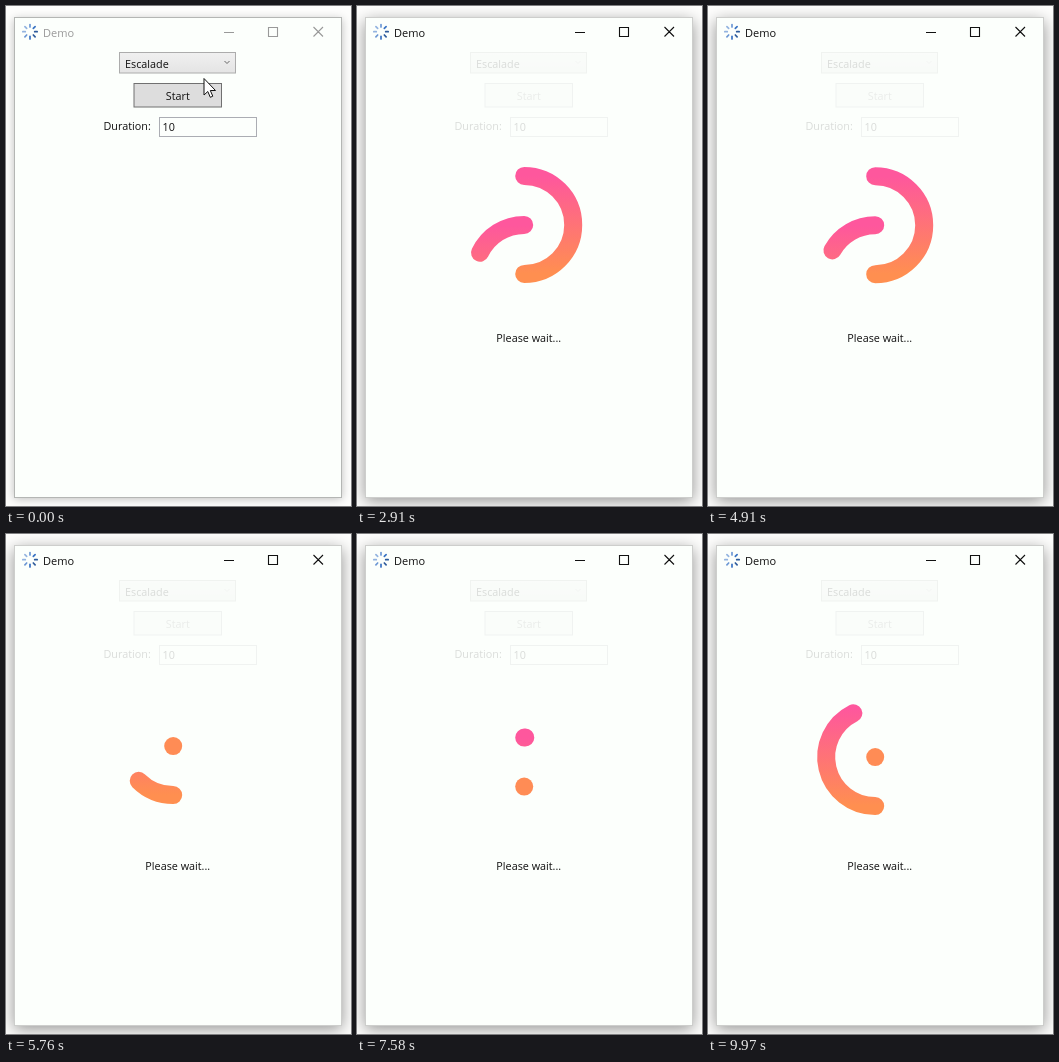
Animation, 345 px wide and 500 px high, one loop 10 s. Source, as an HTML page:

```html
<!DOCTYPE html>
<html lang="en">
<head>
<meta charset="utf-8">
<title>Demo</title>
<style>
  html, body { margin: 0; width: 100%; height: 100%; overflow: hidden; background: #fdfdfc; }
  svg { display: block; width: 345px; height: 500px; }
  text { font: 10.8px "Open Sans", "Noto Sans", sans-serif; fill: #111; }
  #title { font-size: 11px; }
  #arcs path { fill: none; stroke-width: 18; stroke-linecap: round; }
  .busy #label { fill: #838383; }
  .busy #chevron { stroke: #bfbfbf; }
</style>
</head>
<body>
<svg viewBox="0 0 345 500">
  <defs>
    <linearGradient id="warm" gradientUnits="userSpaceOnUse" x1="0" y1="-58" x2="0" y2="58">
      <stop offset=".08" stop-color="#fe579d"/>
      <stop offset=".92" stop-color="#ff8f50"/>
    </linearGradient>
    <linearGradient id="face" x2="0" y2="1">
      <stop stop-color="#f0f0f0"/>
      <stop offset="1" stop-color="#e4e4e4"/>
    </linearGradient>
  </defs>

  <rect id="shadow" x="8" width="328" height="480"/>
  <rect id="frame" x="8.5" y="11.5" width="327" height="480" fill="#fcfffc"/>

  <g id="icon" stroke-width="1.7" stroke-linecap="round"></g>
  <text id="title" x="37" y="30.500">Demo</text>
  <g id="buttons" fill="none" stroke-width="1.1">
    <path d="M218 26.500H228M262.500 21.500H271.500V30.500H262.500ZM307.500 21L317 30.500M317 21L307.500 30.500"/>
  </g>

  <g id="form">
    <rect x="113.500" y="46.500" width="116" height="20.500" fill="url(#face)" stroke="#acacac"/>
    <text x="119" y="61.500">Escalade</text>
    <path id="chevron" d="M218.500 55L221 57.500L223.500 55" fill="none" stroke="#666"/>
    <rect id="start" x="128" y="77.500" width="87.500" height="23.500"/>
    <text id="label" x="171.800" y="93.500" text-anchor="middle">Start</text>
    <text x="97.500" y="124">Duration:</text>
    <rect x="153.500" y="111.500" width="97" height="19" fill="#fcfffc" stroke="#abadb3"/>
    <text x="156.500" y="125">10</text>
  </g>

  <g id="busy">
    <g id="arcs"><path id="right"/><path id="left"/></g>
    <text x="171.800" y="335.500" text-anchor="middle">Please wait...</text>
  </g>

  <path id="cursor" d="M0 0V16.500L3.800 13L6.300 18.800L8.800 17.700L6.300 12H11.500Z" fill="#fff" stroke="#111"/>
</svg>
<script>
const LOOP = 10000, CYCLE = 1993, CYCLE_START = 1616;
const CLICK = 1030, BUSY = 1110, LEAVE = 2060, GONE = 2260;
const R = 49, CX = 167.2, TOP = 155.2;

const el = id => document.getElementById(id);
const set = (id, attrs) => {
  for (const k in attrs) el(id).setAttribute(k, attrs[k]);
};
const clamp = x => Math.min(1, Math.max(0, x));
const mix = (a, b, k) => a + (b - a) * k;
const mod = (a, n) => ((a % n) + n) % n;
const ease = x => mix(x, (1 - Math.cos(Math.PI * x)) / 2, 0.8);

// Title bar icon: eight rays, paler on the left
el('icon').innerHTML = Array.from({ length: 8 }, (_, i) => {
  const a = i * Math.PI / 4, s = Math.sin(a), c = -Math.cos(a);
  const light = 56 - 18 * Math.sin(a - 0.4);
  return `<path d="M${24 + 4.7 * s} ${25.7 + 4.7 * c}L${24 + 7.2 * s} ${25.7 + 7.2 * c}" stroke="hsl(215 55% ${light}%)"/>`;
}).join('');

// Part of a half circle; a and b run from 0 (top) to 1 (bottom)
function drawArc(id, side, cy, a, b) {
  const at = k => `${side * R * Math.sin(k * Math.PI)} ${-R * Math.cos(k * Math.PI)}`;
  const dot = b - a < 0.002;
  set(id, {
    d: dot ? `M${at(a)}h0.01` : `M${at(a)}A${R} ${R} 0 0 ${side > 0 ? 1 : 0} ${at(b)}`,
    stroke: dot ? '#ff8c55' : 'url(#warm)',
    transform: `translate(${CX} ${cy})`
  });
}

function drawSpinner(t) {
  const p = mod(t - CYCLE_START, CYCLE) / CYCLE * 4;
  const step = Math.floor(p), rest = 1 - ease(p - step);
  const cy = TOP + 2 * R * p / 4;
  const left = [[rest, 1], [0, 1], [0, rest], [0, 0]][step];
  const right = [[1, 1], [rest, 1], [0, 1], [0, rest]][step];
  drawArc('right', 1, cy, ...right);
  drawArc('left', -1, cy + R, ...left);
}

function drawWindow(t) {
  const active = t >= CLICK, busy = t >= BUSY;
  el('shadow').style.filter = `blur(${active ? 8 : 5}px)`;
  set('shadow', { y: active ? 15 : 13, opacity: active ? 0.42 : 0.25 });
  set('frame', { stroke: active ? '#cdcecc' : '#b4b6b4' });
  set('buttons', { stroke: active ? '#111' : '#999' });
  el('title').style.fill = active ? '#111' : '#999';

  const [fill, stroke] = busy ? ['#f4f4f4', '#adb2b5']
    : active ? ['#c4e5f6', '#2c628b']
    : t >= 70 ? ['#bee6fd', '#3c7fb1']
    : ['#ddd', '#707070'];
  set('start', { fill, stroke });
  set('form', { opacity: busy ? 0.14 : 1, class: busy ? 'busy' : '' });
  set('busy', { visibility: busy ? 'visible' : 'hidden' });
}

function drawCursor(t) {
  const come = clamp((t - 30) / 120), go = clamp((t - LEAVE) / (GONE - LEAVE));
  const x = mix(mix(198, 173.500, come), 313, go);
  const y = mix(mix(72.500, 90.500, come), 97, go);
  set('cursor', {
    transform: `translate(${x} ${y})`,
    visibility: t < GONE ? 'visible' : 'hidden'
  });
}

function frame() {
  const t = performance.now() % LOOP;
  drawWindow(t);
  drawSpinner(t);
  drawCursor(t);
  requestAnimationFrame(frame);
}
frame();
</script>
</body>
</html>
```
